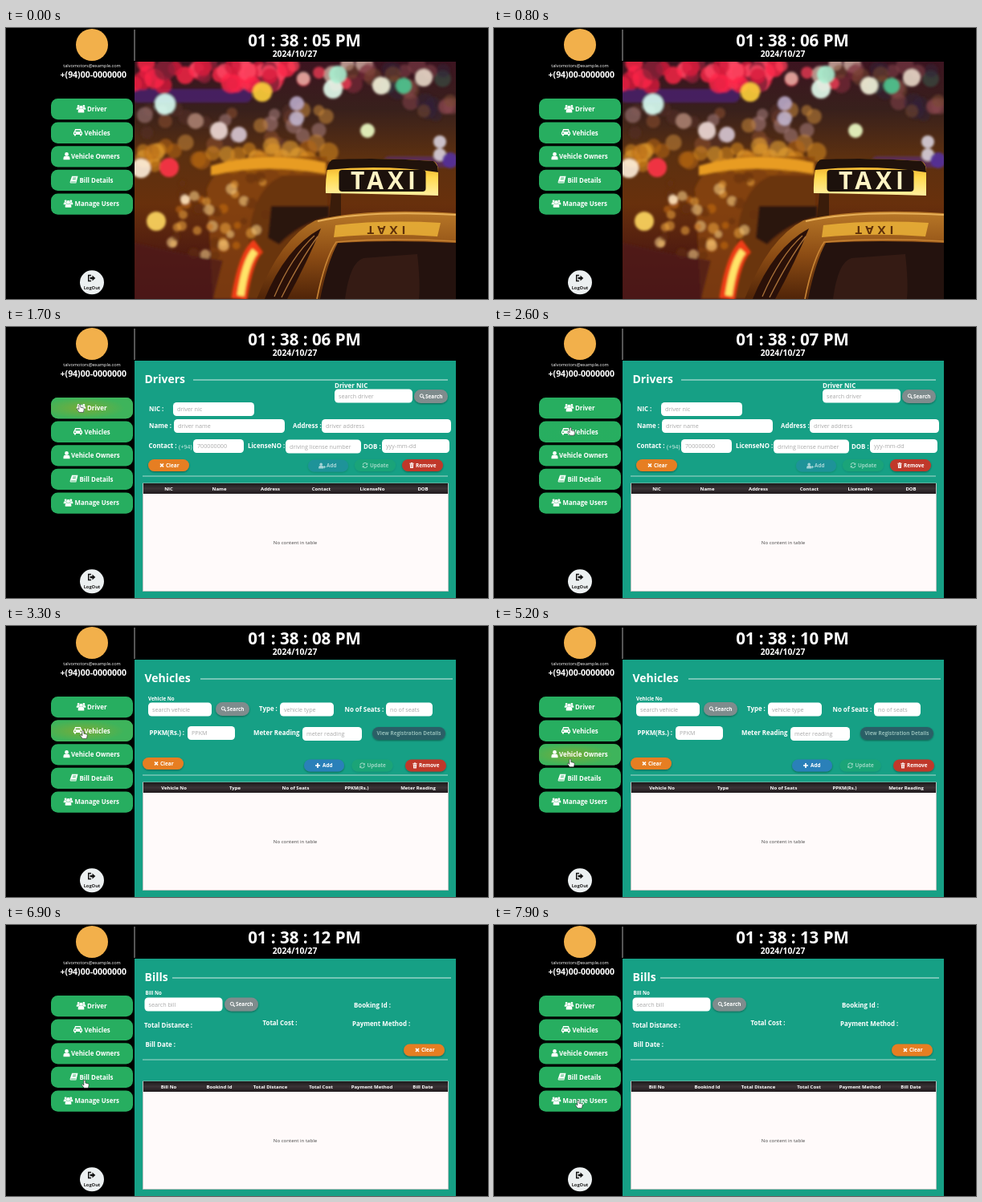
An HTML page for the animation above (8000 ms loop, 600x338 px).

```html
<!DOCTYPE html>
<html>
<head>
<meta charset="utf-8">
<style>
html, body { margin: 0; width: 100%; height: 100%; overflow: hidden; background: #000; }
svg { display: block; width: 600px; height: 338px; font-family: "Open Sans", "Noto Sans", sans-serif; }
</style>
</head>
<body>
<svg id="stage" viewBox="0 0 600 338" xmlns="http://www.w3.org/2000/svg"></svg>
<script>
const TEAL = '#16a085', GREEN = '#27ae60';
const stage = document.getElementById('stage');

const rect = (x, y, w, h, fill, r = 0, more = '') =>
  `<rect x="${x}" y="${y}" width="${w}" height="${h}" rx="${r}" fill="${fill}" ${more}/>`;
const disc = (x, y, r, fill, o = 1) => `<circle cx="${x}" cy="${y}" r="${r}" fill="${fill}" opacity="${o}"/>`;
const shape = (d, fill, more = '') => `<path d="${d}" fill="${fill}" ${more}/>`;
const line = (d, color, w, more = '') => shape(d, 'none', `stroke="${color}" stroke-width="${w}" ${more}`);
const text = (s, x, y, size, { fill = '#fff', weight = 700, anchor = 'start', more = '' } = {}) =>
  `<text x="${x}" y="${y}" font-size="${size}" fill="${fill}" font-weight="${weight}" text-anchor="${anchor}" ${more}>${s}</text>`;
const at = (x, y, s, scale = 1) => `<g transform="translate(${x} ${y}) scale(${scale})">${s}</g>`;

// Icons, centred on the origin
const person = disc(0, -2.3, 2.4, '#fff') + shape('M-4 4.6V3Q-4 0 -1.8 0H1.8Q4 0 4 3V4.6Z', '#fff');
const icons = {
  user: person,
  users: at(-3.3, -1.6, person, .62) + at(3.3, -1.6, person, .62) +
    `<g stroke="${GREEN}" stroke-width=".7" paint-order="stroke">${at(0, .6, person, .95)}</g>`,
  car: shape('M-3.4-4H3.4L4.6-.8Q5.6-.4 5.6.6V3H4.6V4.5H2.6V3H-2.6V4.5H-4.6V3H-5.6V.6Q-5.6-.4-4.6-.8ZM-2.5-2.7-3.2-.8H3.2L2.5-2.7ZM-4.4.5V1.8H-2.8V.5ZM2.8.5V1.8H4.4V.5Z', '#fff', 'fill-rule="evenodd"'),
  book: shape('M-2.4-4.5H5L2.8 4.2H-4Q-5.4 4-4.8 2.4Z', '#fff') + line('M-1.2-2.4H2.8M-1.7-.7H2.3M-4 2.7H2.3', GREEN, .8),
  exit: line('M-.6-3.6H-4V3.6H-.6', '#111', 1.5) + shape('M-2-1.2H1V-3.6L5 0 1 3.6V1.2H-2Z', '#111'),
  clear: line('M-2-2 2 2M2-2-2 2', '#fff', 1.7),
  add: line('M-3 0H3M0-3V3', '#fff', 1.7),
  addUser: at(-.8, 0, person, .75) + line('M1.6 1.6H5M3.3 0V3.3', '#fff', 1),
  update: line('M-2.8-.5A2.8 2.8 0 0 1 2.5-1.4M2.8.5A2.8 2.8 0 0 1-2.5 1.4', '#fff', 1.1) + shape('M3.3-3.3V-.6H.6ZM-3.3 3.3V.6H-.6Z', '#fff'),
  remove: shape('M-2.7-2.7H-1V-3.6H1V-2.7H2.7V-1.8H-2.7ZM-2.2-1.3H2.2L1.9 3.5H-1.9Z', '#fff') + line('M-.7-.4V2.6M.7-.4V2.6', '#c0392b', .5),
  search: line('M.9.9 2.8 2.8', '#fff', 1.3) + '<circle cx="-.7" cy="-.7" r="2" fill="none" stroke="#fff"/>'
};

// Form parts
const title = (s, x1, x2) => text(s, 172.5, 69.5, 14) + line(`M${x1} 66H${x2}`, '#d5ece7', 1);
const label = (s, x, y, size = 7.9) => text(s, x, y, size);
const field = (x, y, w, hint) => rect(x, y, w, 17, '#fff', 4.5) +
  text(hint, x + 5, y + 11.3, 7.2, { fill: '#a9a9a9', weight: 400 });
const pill = (x, y, w, h, fill, opacity = 1) =>
  `<g filter="url(#shadow)" opacity="${opacity}">${rect(x, y, w, h, fill, h / 2)}</g>`;
const face = (s, icon, x, y, gap, opacity = 1) =>
  `<g opacity="${opacity}">${at(x, y, icons[icon])}${text(s, x + gap, y + 2.3, 6.4)}</g>`;
const search = (x, y) => pill(x, y, 42, 17, '#7f8c8d') + face('Search', 'search', x + 10, y + 8.5, 4);
const clear = (x, y) => pill(x, y, 51, 15, '#e67e22') + face('Clear', 'clear', x + 17, y + 7.5, 5);
const remove = (x, y) => pill(x, y, 51, 15, '#c0392b') + face('Remove', 'remove', x + 12, y + 7.5, 5);
const update = (x, y, o) => pill(x, y, 51, 15, GREEN, o) + face('Update', 'update', x + 13, y + 7.5, 6, .55);
const add = (x, y, icon, o) => pill(x, y, 50, 15, '#2980b9', o) + face('Add', icon, x + 17, y + 7.5, 6, o < 1 ? .6 : 1);
const rule = y => line(`M170 ${y}H550`, '#a9d9ce', 1);
const table = heads => rect(170.5, 195, 380, 134.5, '#fffafa', 0, 'stroke="#c8c0c0" stroke-width=".8"') +
  rect(171, 195, 379, 13, 'url(#head)') +
  heads.map(([s, x]) => text(s, x, 203.7, 6, { anchor: 'middle' })).join('') +
  text('No content in table', 360, 270.5, 6.1, { fill: '#444', weight: 400, anchor: 'middle' });
const dialCode = (x, y) => text('(+94)', x, y, 7.2, { fill: '#d6eee8', weight: 400 });

const drivers = title('Drivers', 233, 550) +
  label('Driver NIC', 409, 75.8, 8) + field(409, 77.5, 97, 'search driver') + search(508, 78) +
  label('NIC :', 178, 105) + field(208, 94, 101, 'driver nic') +
  label('Name :', 178, 126) + field(209, 115, 138, 'driver name') +
  label('Address :', 357, 126) + field(393, 115, 161, 'driver address') +
  label('Contact :', 177.5, 150.5) + dialCode(215, 151.5) + field(233, 140, 63, '700000000') +
  label('LicenseNO :', 301, 150.5) + field(348, 140.5, 94, 'driving license number') +
  label('DOB :', 445, 151.5) + field(468, 140, 84, 'yyy-mm-dd') +
  clear(177, 165) + add(376, 165.5, 'addUser', .4) + update(434, 165, .3) + remove(493, 165) + rule(186) +
  table([['NIC', 202.5], ['Name', 265.5], ['Address', 329], ['Contact', 392.5], ['LicenseNo', 456], ['DOB', 519]]);

const vehicles = title('Vehicles', 242, 556) +
  label('Vehicle No', 177, 93, 6.2) + field(177, 95.5, 79, 'search vehicle') + search(261, 95) +
  label('Type :', 315, 105.8) + field(341, 95.5, 67, 'vehicle type') +
  label('No of Seats :', 421.5, 107) + field(473, 95.5, 58, 'no of seats') +
  label('PPKM(Rs.) :', 178.5, 135.5) + field(226, 125, 59, 'PPKM') +
  label('Meter Reading', 308, 136) + field(369, 126, 74, 'meter reading') +
  pill(456, 126, 91, 16, '#2b5f66') +
  text('View Registration Details', 501.5, 136.3, 6.4, { anchor: 'middle', fill: '#8fb9b4' }) +
  clear(170, 164) + add(371, 166.5, 'add', 1) + update(430.5, 166.5, .35) + remove(497, 166.5) + rule(186) +
  table([['Vehicle No', 209], ['Type', 285], ['No of Seats', 360.5], ['PPKM(Rs.)', 436.5], ['Meter Reading', 513]]);

const owners = title('Vehicle Owners', 285, 550) +
  label('Owner NIC', 378, 76.8, 6.1) + field(377.5, 81, 97, 'enter owner nic') + search(477, 81) +
  label('NIC :', 178, 119) + field(201.5, 108.5, 126, 'vehicle owner nic') +
  label('Name :', 345, 120) + field(376, 109.5, 177, 'vehicle owner name') +
  label('Contact :', 177.5, 151) + dialCode(213, 151) + field(231, 140.5, 97, '700000000') +
  label('Address :', 338, 151) + field(377, 140.5, 178, 'vehicle owner address') +
  clear(177, 165) + add(376, 165.5, 'addUser', .4) + update(434, 165, .75) + remove(493, 165) + rule(186) +
  table([['NIC', 213], ['Name', 308], ['Address', 413.5], ['Contact', 508.5]]);

const bills = title('Bills', 207, 554) +
  label('Bill No', 173.5, 87, 6.2) + field(172.5, 90.5, 97, 'search bill') + search(272, 90.5) +
  label('Booking Id :', 433, 102.5) + label('Total Distance :', 172, 128.3) + label('Total Cost :', 319.5, 125) +
  label('Payment Method :', 431, 126) + label('Bill Date :', 173.5, 152) +
  clear(495, 148.5) + rule(168) +
  table([['Bill No', 202.5], ['Bookind Id', 265.5], ['Total Distance', 329], ['Total Cost', 392], ['Payment Method', 455.5], ['Bill Date', 519]]);

// Night street in soft shapes with a cab in front
function photo() {
  let seed = 7;
  const rnd = (a, b) => (seed = seed * 16807 % 2147483647, a + (b - a) * seed / 2147483647);
  const lights = (n, x1, x2, y1, y2, r, o, ...colors) => Array.from({ length: n }, () =>
    disc(rnd(x1, x2), rnd(y1, y2), rnd(r * .6, r), colors[Math.floor(rnd(0, colors.length))], o)).join('');
  const spots = [[198, 95, 13, '#d8fff4'], [319, 80, 12, '#ffd23c'], [407, 76, 12, '#e4fff0'], [413, 58, 11, '#a8f0d0'],
    [362, 94, 9, '#b9a8c8'], [362, 113, 9, '#c0b4cc'], [265, 128, 11, '#f0dcd8'], [290, 133, 10, '#d8c8d4'],
    [236, 116, 10, '#a88070'], [450, 128, 9, '#eeffc8'], [203, 174, 12, '#ff3448'], [168, 175, 12, '#fff0dc'],
    [187, 241, 12, '#ffd860'], [223, 214, 6, '#ffe4c0'], [467, 72, 11, '#f4f4dc'], [495, 72, 10, '#4cc890'],
    [520, 62, 11, '#e8d8c8'], [540, 142, 8, '#d8d0dc'], [540, 158, 8, '#d8d0dc'], [553, 165, 10, '#54309a']];
  return '<g clip-path="url(#view)">' + rect(160, 42, 400, 296, 'url(#night)') +
    '<g filter="url(#soft)">' +
    rect(156, 76, 150, 17, '#4a2470', 8, 'opacity=".8"') +
    rect(470, 160, 90, 14, '#5c2c80', 7, 'opacity=".6"') +
    lights(46, 160, 350, 44, 72, 13, .8, '#ff2448', '#ff4864', '#d81c3c', '#8c2038') +
    lights(12, 350, 450, 44, 72, 12, .7, '#ff4058', '#e8c8b8', '#782838') +
    lights(26, 430, 560, 46, 110, 12, .5, '#7a4c30', '#386050', '#8c4850', '#302038') +
    lights(30, 165, 400, 100, 150, 11, .55, '#8c5030', '#c88838', '#583028', '#a88080') +
    lights(36, 160, 410, 146, 176, 12, .55, '#d88c20', '#b86814', '#f0ac34') +
    shape('M250 200Q265 166 310 160H400V260L340 338H258Z', '#8c480c', 'opacity=".75"') +
    shape('M305 240Q315 195 345 184H400V250L350 338H295Z', '#6a3408') +
    shape('M255 172Q320 151 398 168V182Q320 168 255 184Z', '#e89c24') +
    lights(44, 205, 325, 185, 285, 7, .55, '#f0a840', '#c87018', '#64300c', '#ffd890') +
    shape('M330 222H402V236Q365 244 340 270L326 262Z', '#2c1208') +
    shape('M160 268Q225 284 270 290L258 338H160Z', '#501c1c', 'opacity=".8"') +
    spots.map(([x, y, r, c]) => disc(x, y, r, c, .9)).join('') +
    line('M314 272Q299 283 290 338', '#f03c14', 19) + line('M310 278Q298 292 292 334', '#ffe468', 9) + '</g>' +
    shape('M405 206H417V238H402Z', '#3a1c0a') +
    shape('M312 338Q342 262 385 240Q450 224 560 231V338Z', 'url(#roof)') +
    shape('M322 338Q348 274 392 250Q376 290 350 338Z', '#2a1008') +
    line('M334 335Q356 284 384 259M343 336Q366 290 388 260', '#a87038', 1.3) +
    shape('M391 338Q400 292 413 268Q480 264 560 268V338Z', '#24120e') +
    shape('M422 338Q428 292 445 287L512 282Q516 318 514 338Z', '#3c2018', 'opacity=".7"') +
    line('M387 338Q397 288 411 267Q480 261 560 266', '#c88434', 1.6) +
    line('M388 241Q450 227 560 233', '#e8b058', 2) +
    shape('M410 246Q470 239 541 243L537 260Q470 255 408 261Z', '#ecb238', 'opacity=".85"') +
    at(476, 246.5, text('TAXI', 0, 0, 15, { anchor: 'middle', fill: '#5f300b', more: 'letter-spacing="5" transform="scale(1 -1)"' })) +
    shape('M404 165Q470 161 532 166Q538 168 538 180V209Q465 207 398 206Q397 180 404 165Z', 'url(#sign)') +
    shape('M399 177Q402 164 408 164Q470 161 532 166Q538 170 538 180Q470 170 399 177Z', '#20120b') +
    rect(414.5, 177, 108, 27, '#1c110c', 4) +
    text('TAXI', 472, 201, 30, { anchor: 'middle', fill: '#fff4c4', more: 'letter-spacing="5"' }) + '</g>';
}

const stops = colors => colors.map((c, i) => `<stop offset="${i / (colors.length - 1)}" stop-color="${c}"/>`).join('');
const gradient = (id, ...colors) => `<linearGradient id="${id}" x1="0" y1="0" x2="0" y2="1">${stops(colors)}</linearGradient>`;

const menu = [['Driver', 'users', 101, 93.5], ['Vehicles', 'car', 97.5, 89.5], ['Vehicle Owners', 'user', 81, 75.5],
  ['Bill Details', 'book', 91.5, 84.5], ['Manage Users', 'users', 85.5, 77.5]];
const menuItem = ([s, icon, x, iconX], i) => {
  const y = 88 + i * 29.6;
  return rect(56, y, 102, 26.3, GREEN, 8.5) + rect(56, y, 102, 26.3, 'url(#hover)', 8.5, 'class="hover"') +
    at(iconX, y + 12.5, icons[icon]) + text(s, x, y + 16, 7.9);
};

stage.innerHTML = `<defs>
  ${gradient('head', '#1c1a1b', '#3b3336', '#20191c')}
  ${gradient('night', '#3c1420', '#38201c', '#5c3010', '#68300c', '#501c10', '#3c1010')}
  ${gradient('roof', '#b87828', '#8c4c14', '#502408')}
  ${gradient('sign', '#e99a16', '#ffd94f', '#fff0a0')}
  <radialGradient id="hover" cx=".4" cy=".5" r=".5"><stop offset="0" stop-color="#79ab38"/><stop offset="1" stop-color="#3eb45b"/></radialGradient>
  <clipPath id="view">${rect(160, 42, 400, 296, '#fff')}</clipPath>
  <filter id="soft"><feGaussianBlur stdDeviation="1.6"/></filter>
  <filter id="shadow" x="-20%" y="-30%" width="140%" height="180%"><feDropShadow dx="0" dy="1" stdDeviation="1.2" flood-opacity=".4"/></filter>
  </defs>` + rect(0, 0, 600, 338, '#000') + disc(107, 21, 20, '#f2b04b') +
  text('talvomotors@example.com', 107, 48.8, 5.6, { weight: 400, anchor: 'middle' }) +
  text('+(94)00-0000000', 108.8, 62.2, 10.5, { anchor: 'middle' }) +
  line('M160 2V41', '#aaa', 1) +
  text('', 371.5, 22.8, 20.5, { anchor: 'middle', more: 'id="clock"' }) +
  text('2024/10/27', 359.5, 36.2, 10.3, { anchor: 'middle' }) +
  menu.map(menuItem).join('') +
  disc(107, 317.3, 15, '#ecf0f1') + at(106.5, 312, icons.exit, .95) +
  text('LogOut', 107, 325.6, 5.7, { anchor: 'middle', fill: '#222' }) +
  `<g class="page">${photo()}</g>` +
  [drivers, vehicles, owners, bills].map(p => `<g class="page">${rect(160, 42, 400, 296, TEAL)}${p}</g>`).join('') +
  `<g id="hand">${shape('M-1.2 0Q0-1.2 .9 0V3.2L4.4 4Q5.4 4.4 5.2 5.8L4.4 9.4H-.8L-3.6 5.6Q-3.6 4.4-2.4 4.8L-1.2 6Z', '#fff', 'stroke="#222" stroke-width=".6"')}</g>`;

const clock = document.getElementById('clock');
const hand = document.getElementById('hand');
const pages = [...document.querySelectorAll('.page')];
const hovers = [...document.querySelectorAll('.hover')];

const pageStarts = [0, 1400, 3000, 5600, 6700];
const hoverTimes = [[1050, 1950], [2600, 3500], [4400, 5650], [6450, 6900], [7350, 7700]];
// time, x, y of the pointer
const path = [[1000, 112, 112], [1200, 92, 97], [2300, 92, 97], [2700, 96, 131], [3900, 96, 131], [4500, 95, 166],
  [6050, 95, 167], [6500, 98, 193], [7000, 98, 194], [7500, 105, 219], [8000, 105, 219]];

function pointer(t) {
  const i = Math.max(1, path.findIndex(p => p[0] > t));
  const [a, b] = [path[i - 1], path[i]];
  const u = Math.max(0, (t - a[0]) / (b[0] - a[0]));
  const k = u * u * (3 - 2 * u);
  return [a[1] + (b[1] - a[1]) * k, a[2] + (b[2] - a[2]) * k];
}

function draw() {
  const t = performance.now() % 8000;
  const second = 5 + Math.floor((t + 230) / 1000);
  clock.textContent = `01 : 38 : ${String(second).padStart(2, '0')} PM`;
  const current = pageStarts.filter(s => s <= t).length - 1;
  pages.forEach((p, i) => p.style.display = i === current ? '' : 'none');
  hovers.forEach((h, i) => {
    const [from, to] = hoverTimes[i];
    h.style.opacity = Math.max(0, Math.min(1, (t - from) / 150, (to - t) / 150));
  });
  hand.style.display = t < 1000 ? 'none' : '';
  hand.setAttribute('transform', `translate(${pointer(t).join(' ')})`);
  requestAnimationFrame(draw);
}
draw();
</script>
</body>
</html>
```
